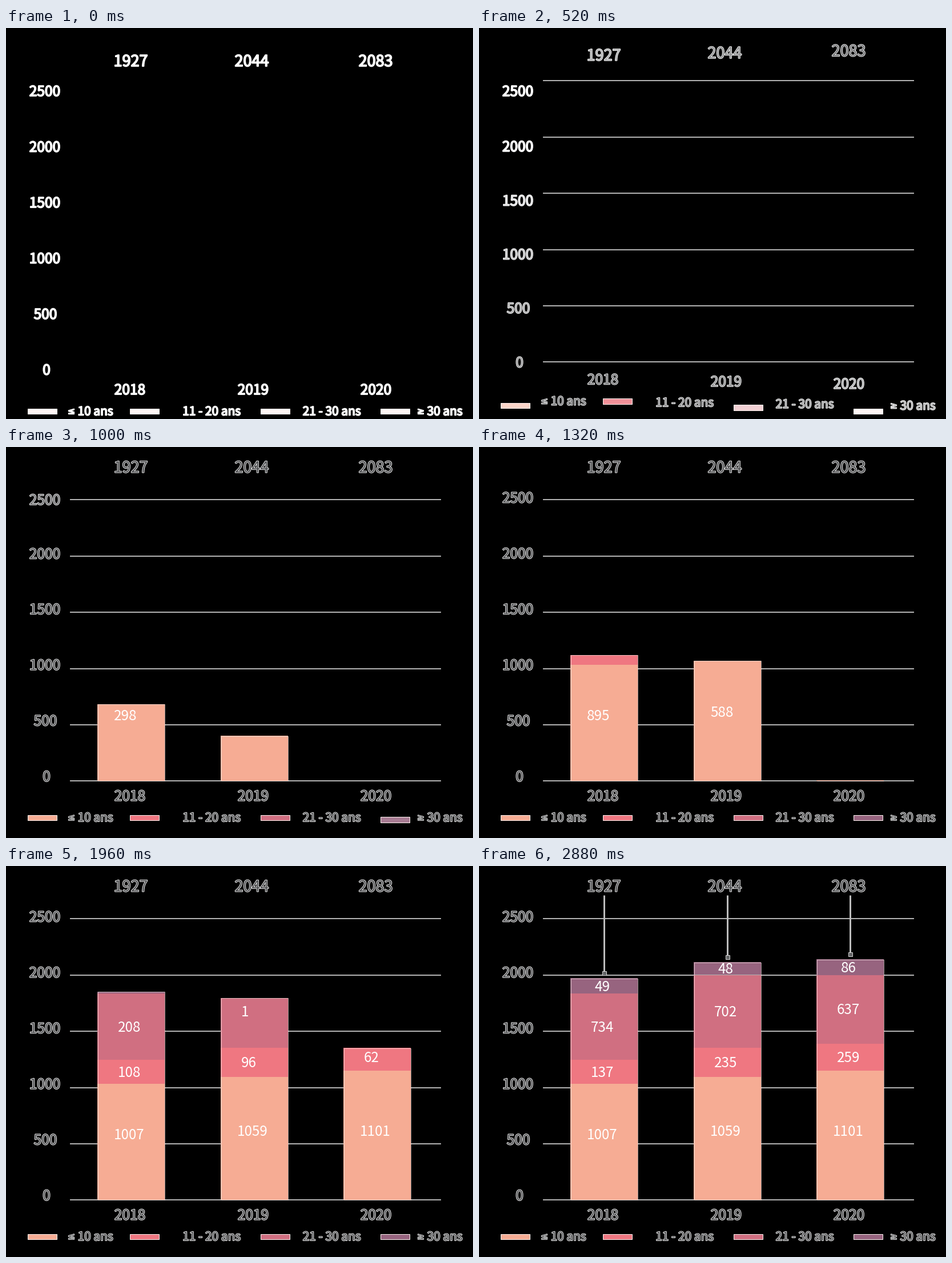
A matplotlib script for the animation above (3.88 s loop, 818 px wide and 684 px high).

```python
import matplotlib.pyplot as plt
from matplotlib.animation import FuncAnimation
from matplotlib.colors import to_rgb
from matplotlib.patches import Rectangle
from matplotlib.patheffects import withStroke
import numpy as np

W, H, DPI = 818, 684, 100
STEP, FRAMES = 40, 97          # 40 ms per frame, 3880 ms per loop
SETTLED = 2880                 # nothing moves after this time
PT = 72 / DPI                  # points per pixel
SANS = "Noto Sans CJK JP"
CAP, ADVANCE = 0.733, 0.555    # digit height and width in em

COLORS = ["#f6ac94", "#ef7781", "#d06f81", "#97647f"]
INK, RIM, GRID = "#4f5052", "#ececec", "#d2d2d2"
FIRST, BEAT = 95, 72           # stagger of the sliding labels
BASE, COL_W = 584, 118

plt.rcParams["toolbar"] = "None"
fig = plt.figure(figsize=(W / DPI, H / DPI), dpi=DPI, facecolor="black")
ax = fig.add_axes([0, 0, 1, 1])
ax.set_xlim(0, W)
ax.set_ylim(H, 0)
ax.axis("off")


def linear(t, start, dur):
    return min(max((t - start) / dur, 0), 1)


def ease(t, start, dur):
    u = linear(t, start, dur)
    return u * u * (3 - 2 * u)


def mix(a, b, p):
    return tuple(np.array(to_rgb(a)) * (1 - p) + np.array(to_rgb(b)) * p)


def halo(width, color):
    return [withStroke(linewidth=width * PT, foreground=color)]


def box(x, y, w, h, z, **style):
    return ax.add_patch(Rectangle((x, y), w, h, zorder=z, **style))


class SlideText:
    """Text that slides up while its white fill turns grey."""

    def __init__(self, x, y, text, size, start, rise=22.3, ha="center",
                 family=SANS, drop=None):
        self.y = y + (CAP * size / 2 if drop is None else drop)
        self.start, self.rise = start, rise
        self.art = ax.text(x, self.y, text, ha=ha, va="baseline", zorder=6,
                           family=family, fontsize=size * PT)

    def update(self, t):
        p = ease(t, self.start, 600)
        self.art.set_y(self.y - self.rise * p)
        self.art.set_color(mix("white", INK, p))
        self.art.set_path_effects(halo(1.9, mix("white", RIM, p)))


class Swatch:
    """Legend key that slides up and takes on its colour."""

    def __init__(self, x, color, start):
        self.color, self.start = color, start
        self.art = box(x + 0.5, 0, 51, 9.5, 4, lw=PT, ec="#fdf2ef")

    def update(self, t):
        p = ease(t, self.start, 600)
        self.art.set_y(665.5 - 22 * p)
        self.art.set_facecolor(mix("#fff6f4", self.color, p))


class GridLine:
    X0, X1 = 112, 762

    def __init__(self, y):
        self.art, = ax.plot([], [], color=GRID, lw=1.7 * PT, zorder=1,
                            solid_capstyle="butt")
        self.y = y

    def update(self, t):
        end = self.X0 + (self.X1 - self.X0) * ease(t, 20, 500)
        self.art.set_data([self.X0, end], [self.y, self.y])
        self.art.set_visible(end > self.X0)


class Segment:
    """One slice of a column, growing up from its floor."""

    def __init__(self, x, floor, height, color, start, dur):
        self.floor, self.height = floor, height
        self.start, self.dur = start, dur
        self.art = box(x, floor, COL_W, 0, 2, lw=0, fc=color)

    def update(self, t):
        h = self.height * ease(t, self.start, self.dur)
        self.art.set_y(self.floor - h)
        self.art.set_height(h)
        return h


class Counter:
    """Number that counts up, left-aligned where its final value starts."""
    SIZE = 24.2

    def __init__(self, cx, y, value, start):
        left = cx - len(str(value)) * ADVANCE * self.SIZE / 2
        self.y, self.value, self.start = y, value, start
        self.art = ax.text(left, y + CAP * self.SIZE / 2, "", color="white",
                           family=SANS, fontsize=self.SIZE * PT, zorder=6,
                           va="baseline")

    def update(self, t, peak):
        self.art.set_visible(t > self.start)
        self.art.set_text(str(round(self.value * linear(t, self.start, 540))))
        uncovered = peak > self.y - 8
        self.art.set_path_effects(halo(1.6, "white") if uncovered else [])


class Column:
    """Stacked segments; each takes `pace` times as long as the one below."""

    def __init__(self, x, heights, values, start, dur, pace, counts, low):
        cx, floor = x + COL_W / 2, BASE
        first, second, last = counts
        ticks = [first, *np.linspace(second, last, 3)]
        self.segs, self.counters = [], []
        for k, (h, value, tick) in enumerate(zip(heights, values, ticks)):
            self.segs.append(Segment(x, floor, h, COLORS[k], start, dur))
            y = floor - h / 2 if k else low
            self.counters.append(Counter(cx - 3, y, value, tick))
            floor, start, dur = floor - h, start + dur, dur * pace
        self.top = floor
        self.rim = box(x + 0.5, BASE, COL_W - 1, 0, 3, fill=False,
                       ec="#fbeeea", lw=PT, alpha=0.6)

    def update(self, t):
        total = sum(seg.update(t) for seg in self.segs)
        self.rim.set_y(BASE - total + 0.5)
        self.rim.set_height(max(total - 0.5, 0))
        self.rim.set_visible(total > 0)
        for counter in self.counters:
            counter.update(t, BASE - total)


class Callout:
    """Marker above a column with a line rising to the total."""
    TOP = 51

    def __init__(self, x, y, start):
        self.x, self.y, self.start = x, y, start
        self.line, = ax.plot([], [], color="#bcbcbc", lw=3 * PT, zorder=4,
                             solid_capstyle="butt")
        self.dot = box(x - 3.5, y - 3.5, 7, 7, 5, fc="#636466",
                       ec="#d4d4d4", lw=PT)

    def update(self, t):
        p = ease(t, self.start, 380)
        self.line.set_data([self.x] * 2,
                           [self.y, self.y + (self.TOP - self.y) * p])
        self.line.set_visible(p > 0)
        self.dot.set_visible(p > 0)


parts = []

# value axis, bottom to top
for k in range(6):
    text = str(500 * k)
    parts.append(GridLine(92.2 + 98.45 * k))
    parts.append(SlideText(72 - len(text), 597.5 - 97.5 * k, text, 24.5,
                           180 + 45 * k + 6 * k * k, rise=21.7))

columns = [
    Column(160, [203, 42, 116, 26.7], [1007, 137, 734, 49],
           760, 394, 0.95, (840, 1534, 2080), 469),
    Column(376, [215, 51.5, 127, 22.2], [1059, 235, 702, 48],
           739, 638, 0.65, (1020, 1740, 2179), 463),
    Column(591, [226, 47.5, 120, 27.5], [1101, 259, 637, 86],
           1308, 409, 0.8, (1367, 1830, 2242), 463),
]
totals = zip([218.5, 430.5, 647.5], ["1927", "2044", "2083"])
for k, (col, x, (total_x, total)) in enumerate(
        zip(columns, [219, 435, 650], totals)):
    parts += [
        col,
        SlideText(total_x, 57, total, 27, FIRST + BEAT * (2 - k)),
        SlideText(x - 2, 632, str(2018 + k), 24.5, FIRST + BEAT * k),
        Callout(x + 0.3, col.top - 8.5, 2340 + 80 * k),
    ]

# legend: swatch x and turn, then text anchor; outer entries carry a sign
legend = [(37, 2, "≤", "10 ans", 187.5), (216.5, 0, "", "11 - 20 ans", 360),
          (445.5, 3, "", "21 - 30 ans", 570.5),
          (655, 6.4, "≥", "30 ans", 799.5)]
for k, (x, turn, sign, text, anchor) in enumerate(legend):
    start = FIRST + 50 * k
    parts.append(Swatch(x, COLORS[k], FIRST + BEAT * turn))
    parts.append(SlideText(anchor, 669.7, text, 20.9, start,
                           ha="right" if sign else "center"))
    if sign:
        parts.append(SlideText(anchor - 73, 669.7, sign, 15, start,
                               family="DejaVu Sans", drop=5.5))


def draw(frame):
    t = min(frame * STEP, SETTLED)
    for part in parts:
        part.update(t)
    return []


anim = FuncAnimation(fig, draw, frames=FRAMES, interval=STEP, repeat=True,
                     init_func=lambda: draw(0), blit=False,
                     cache_frame_data=False)
plt.show()
```
